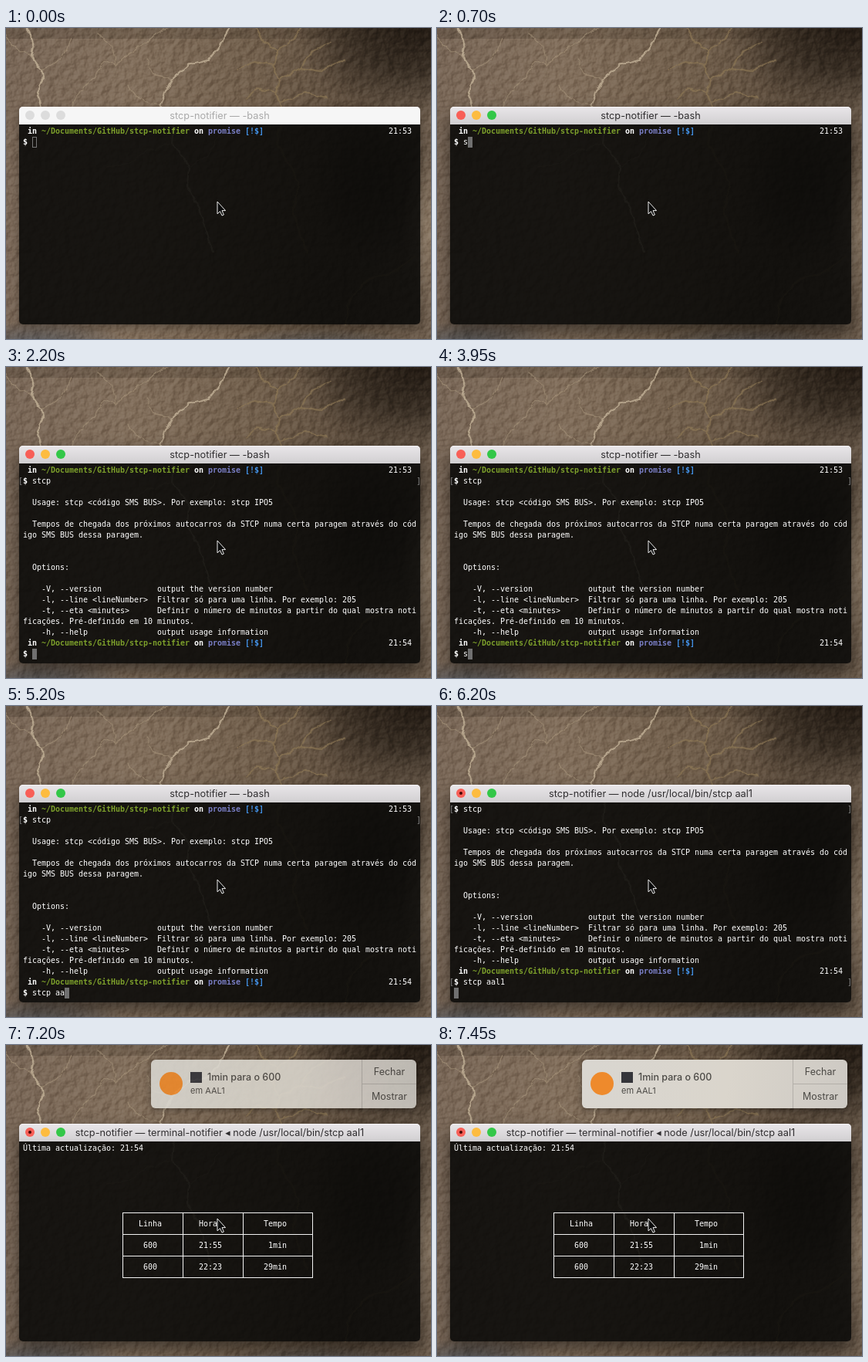
Recreate the animation shown at these times as an HTML page. Size 551 by 403 pixels, loop 8000 ms.

```html
<!DOCTYPE html>
<html lang="pt">
<head>
<meta charset="utf-8">
<title>stcp-notifier</title>
<style>
html, body { margin: 0; width: 100%; height: 100%; overflow: hidden; }
body { position: relative; background: #6f5e4d; font-family: Inter, Roboto, sans-serif; }
svg { position: absolute; left: 0; top: 0; }
.win { position: absolute; left: 17px; top: 102px; width: 520px; height: 282px;
  border-radius: 5px; box-shadow: 0 12px 26px rgba(0,0,0,.5), 0 0 1px rgba(0,0,0,.6); }
.win.idle { box-shadow: 0 5px 13px rgba(0,0,0,.3), 0 0 1px rgba(0,0,0,.5); }
.bar { position: relative; height: 23px; border-radius: 5px 5px 0 0;
  background: linear-gradient(#e9e6e9, #d1cfd1); box-shadow: inset 0 1px #f4f2f4; }
.idle .bar { background: #f6f6f6; }
.title { text-align: center; font-size: 12.75px; line-height: 23px; color: #2f2d2f; white-space: pre; }
.idle .title { color: #a9a9a9; }
.dot { position: absolute; top: 5px; width: 12px; height: 12px; border-radius: 50%; }
.idle .dot { background: #dcdcdc !important; }
.busy .dot:first-child::after { content: ""; position: absolute; left: 4px; top: 4px;
  width: 4px; height: 4px; border-radius: 50%; background: #450804; }
.body { position: absolute; left: 0; top: 23px; width: 520px; height: 259px; overflow: hidden;
  border-radius: 0 0 5px 5px; background: rgba(8,8,7,.88);
  font: 10px/14px "DejaVu Sans Mono", "Noto Sans Mono", monospace; letter-spacing: -.02px; color: #fff; }
.body span { position: absolute; white-space: pre; height: 14px; }
.body b { font-weight: 700; }
.body i { position: absolute; background: #f2f2f2; }
.body b span { position: static; }
.body .mark { color: #8b8b8b; }
.body .cur { width: 6px; background: #707070; }
.idle .body .cur { background: none; box-shadow: inset 0 0 0 1px #777; }
.path { color: #7c9f2b; }
.branch { color: #7a7fc6; }
.flag { color: #4596ee; }
.note { position: absolute; left: 188px; top: 19px; width: 344px; height: 63px; border-radius: 6px;
  background: linear-gradient(100deg, #d9d6d0, #dad5cc 55%, #cdc9c3); color: #4b4945;
  box-shadow: 0 2px 9px rgba(0,0,0,.42); font-size: 12.5px; }
.note > * { position: absolute; white-space: nowrap; }
.logo { left: 11px; top: 16px; width: 30px; height: 30px; border-radius: 50%; background: #ee8a2c; }
.icon { left: 51px; top: 16px; width: 15px; height: 14px; background: #35353a; }
.head { left: 73px; top: 14px; line-height: 17px; font-weight: 500; }
.sub { left: 51px; top: 32px; line-height: 16px; font-size: 11px; }
.btn { left: 273px; width: 71px; height: 31px; line-height: 32px; text-align: center;
  border-left: 1px solid #b3afa9; box-sizing: border-box; }
</style>
</head>
<body>
<svg width="551" height="403" viewBox="0 0 551 403">
  <defs>
    <linearGradient id="land">
      <stop offset="0" stop-color="#7a6858"/><stop offset=".3" stop-color="#826f5c"/>
      <stop offset=".6" stop-color="#715f4c"/><stop offset=".8" stop-color="#5f4f3f"/>
      <stop offset="1" stop-color="#6f5f4f"/>
    </linearGradient>
    <radialGradient id="dark">
      <stop offset="0" stop-color="#211912" stop-opacity=".95"/>
      <stop offset=".45" stop-color="#241c14" stop-opacity=".7"/>
      <stop offset="1" stop-color="#241c14" stop-opacity="0"/>
    </radialGradient>
    <radialGradient id="blue">
      <stop offset="0" stop-color="#4a5058"/><stop offset="1" stop-color="#4a5058" stop-opacity="0"/>
    </radialGradient>
    <radialGradient id="sand">
      <stop offset="0" stop-color="#8f7d69"/><stop offset="1" stop-color="#8f7d69" stop-opacity="0"/>
    </radialGradient>
    <filter id="relief" x="0" y="0" width="100%" height="100%" color-interpolation-filters="sRGB">
      <feTurbulence type="fractalNoise" baseFrequency=".1" numOctaves="4" seed="8"/>
      <feColorMatrix values="0 0 0 0 0  0 0 0 0 0  0 0 0 0 0  1 0 0 0 0"/>
      <feDiffuseLighting surfaceScale="4" lighting-color="#fff" diffuseConstant=".75">
        <feDistantLight azimuth="215" elevation="42"/>
      </feDiffuseLighting>
    </filter>
    <filter id="rough" color-interpolation-filters="sRGB">
      <feTurbulence type="fractalNoise" baseFrequency=".09" numOctaves="2" seed="3"/>
      <feDisplacementMap in="SourceGraphic" scale="7" xChannelSelector="R" yChannelSelector="G"/>
      <feGaussianBlur stdDeviation=".5"/>
    </filter>
  </defs>
  <rect width="551" height="403" fill="url(#land)"/>
  <rect width="551" height="14" fill="#3d3126" opacity=".25"/>
  <ellipse cx="530" cy="5" rx="150" ry="110" fill="url(#dark)"/>
  <ellipse cx="480" cy="200" rx="85" ry="110" fill="url(#dark)" opacity=".5"/>
  <ellipse cx="545" cy="260" rx="30" ry="110" fill="url(#sand)"/>
  <ellipse cx="40" cy="410" rx="120" ry="30" fill="url(#blue)" opacity=".8"/>
  <ellipse cx="400" cy="410" rx="130" ry="22" fill="url(#blue)" opacity=".6"/>
  <rect width="551" height="403" filter="url(#relief)" opacity=".32" style="mix-blend-mode:soft-light"/>
  <g fill="none" stroke-linejoin="round" stroke-linecap="round" filter="url(#rough)">
    <g stroke="#bfae95" stroke-width="2.6" opacity=".85">
      <path d="M27 -4L36 22L33 36L46 54L48 68L40 82L46 104L40 125"/>
      <path d="M292 -4L276 24L262 42L236 48L216 66L208 82L199 100L217 125L215 150L238 180L236 205L252 240L268 290" stroke-width="2.2"/>
    </g>
    <g stroke="#a5937a" stroke-width="1.3" opacity=".65">
      <path d="M33 36L12 26L0 10M46 54L72 40L84 14M199 100L172 92L158 74M216 66L190 60L182 40"/>
      <path d="M214 -4L172 24L142 48L128 42L114 64L96 82L84 104M142 48L138 24L120 8"/>
      <path d="M217 150L185 158L160 175L130 180M238 180L262 165L275 140"/>
    </g>
    <g stroke="#8f7a57" stroke-width="2.4" opacity=".65">
      <path d="M322 -4L334 18L352 30L346 48L354 66L351 84L358 104L352 150L380 200M354 66L382 52L408 56L440 40"/>
      <path d="M352 30L374 14L384 -4M346 48L322 44L300 54M382 52L394 32L420 18M351 84L326 78L312 92M358 96L388 84L416 90" stroke-width="1.8"/>
      <path d="M440 384L446 350L470 325L500 318L530 296M380 200L372 240L390 290"/>
    </g>
  </g>
</svg>

<div class="win" id="win">
  <div class="bar">
    <div class="dot" style="left:8px;background:#f85f57"></div>
    <div class="dot" style="left:28px;background:#fdbc40"></div>
    <div class="dot" style="left:48px;background:#33c748"></div>
    <div class="title" id="title"></div>
  </div>
  <div class="body" id="body"></div>
</div>

<div class="note" id="note">
  <div class="logo"></div><div class="icon"></div>
  <div class="head">1min para o 600</div><div class="sub">em AAL1</div>
  <div class="btn" style="top:0;border-bottom:1px solid #b3afa9;height:32px">Fechar</div>
  <div class="btn" style="top:32px">Mostrar</div>
</div>

<svg width="551" height="403">
  <path d="M274 225V240.8L277.5 237.6L280 243L282.4 242L280 236.6H284.6Z"
    fill="#0b0b0b" stroke="#ededed" stroke-linejoin="round"/>
</svg>

<script>
const LOOP = 8000;
const $ = id => document.getElementById(id);
const win = $("win"), title = $("title"), body = $("body"), note = $("note");

const HELP = [
  "  Usage: stcp <código SMS BUS>. Por exemplo: stcp IPO5", "",
  "  Tempos de chegada dos próximos autocarros da STCP numa certa paragem através do cód",
  "igo SMS BUS dessa paragem.", "", "",
  "  Options:", "",
  "    -V, --version            output the version number",
  "    -l, --line <lineNumber>  Filtrar só para uma linha. Por exemplo: 205",
  "    -t, --eta <minutes>      Definir o número de minutos a partir do qual mostra noti",
  "ficações. Pré-definido em 10 minutos.",
  "    -h, --help               output usage information"
];
const CELLS = [
  [7, 25, "Linha"], [7, 38, "Hora"], [7, 52, "Tempo"],
  [9, 26, "600"], [9, 38, "21:55"], [9, 53, "1min"],
  [11, 26, "600"], [11, 38, "22:23"], [11, 52, "29min"]
];

const esc = s => s.replace(/&/g, "&amp;").replace(/</g, "&lt;");
const at = (row, col, html, cls = "") =>
  `<span class="${cls}" style="left:${5 + col * 6}px;top:${2 + row * 14}px">${html}</span>`;
const text = (row, col, s) => at(row, col, esc(s));
const cursor = (row, col) => at(row, col, "", "cur");
const line = (x, y, w, h) => `<i style="left:${x}px;top:${y}px;width:${w}px;height:${h}px"></i>`;

const prompt = (row, time) => at(row, 1, '<b>in <span class="path">' +
  '~/Documents/GitHub/stcp-notifier</span> on <span class="branch">promise</span> ' +
  '<span class="flag">[!$]</span></b>') + text(row, 79, time);
const input = (row, cmd) => at(row, 0, "<b>$</b>") + text(row, 2, cmd);
const typing = (row, cmd) => input(row, cmd) + cursor(row, 2 + cmd.length);
const sent = (row, cmd) => at(row, -1, "[", "mark") + input(row, cmd) + at(row, 85, "]", "mark");
const help = row => HELP.map((s, i) => text(row + i, 0, s)).join("");

const first = cmd => prompt(0, "21:53") + typing(1, cmd);
const second = cmd => prompt(0, "21:53") + sent(1, "stcp") + help(3) +
  prompt(16, "21:54") + typing(17, cmd);
const table = () => text(0, 0, "Última actualização: 21:54") +
  CELLS.map(c => text(...c)).join("") +
  [0, 1, 2, 3].map(i => line(134, 92 + 28 * i, 247, 1)).join("") +
  [134, 212, 290, 380].map(x => line(x, 92, 1, 85)).join("");

const BASH = "-bash", NODE = "node /usr/local/bin/stcp";
const RUN = NODE + " aal1", ALERT = "terminal-notifier ◂ " + RUN;

// start ms, title, screen, notification opacity
const STEPS = [
  [0, BASH, first("")],
  [200, BASH, first("")],
  [700, BASH, first("s")],
  [950, BASH, first("st")],
  [1200, BASH, first("stcp")],
  [1700, NODE, prompt(0, "21:53") + sent(1, "stcp") + cursor(2, 0)],
  [2200, BASH, second("")],
  [3950, BASH, second("s")],
  [4200, BASH, second("st")],
  [4450, BASH, second("stcp")],
  [4700, BASH, second("stcp ")],
  [5200, BASH, second("stcp aa")],
  [5450, BASH, second("stcp aal")],
  [5950, BASH, second("stcp aal1")],
  [6200, RUN, sent(0, "stcp") + help(2) + prompt(15, "21:54") + sent(16, "stcp aal1") + cursor(17, 0)],
  [6700, RUN, ""],
  [6950, ALERT, table()],
  [7200, ALERT, table(), .9],
  [7450, ALERT, table(), 1]
];

let shown = -1;
function draw(now) {
  const t = now % LOOP;
  const n = STEPS.findLastIndex(s => s[0] <= t);
  if (n !== shown) {
    const [start, name, screen, alpha = 0] = STEPS[shown = n];
    win.className = "win" + (start === 0 ? " idle" : name === BASH ? "" : " busy");
    title.textContent = "stcp-notifier — " + name;
    body.innerHTML = screen;
    note.style.opacity = alpha;
  }
}
function tick() {
  draw(performance.now());
  requestAnimationFrame(tick);
}
tick();
</script>
</body>
</html>
```
